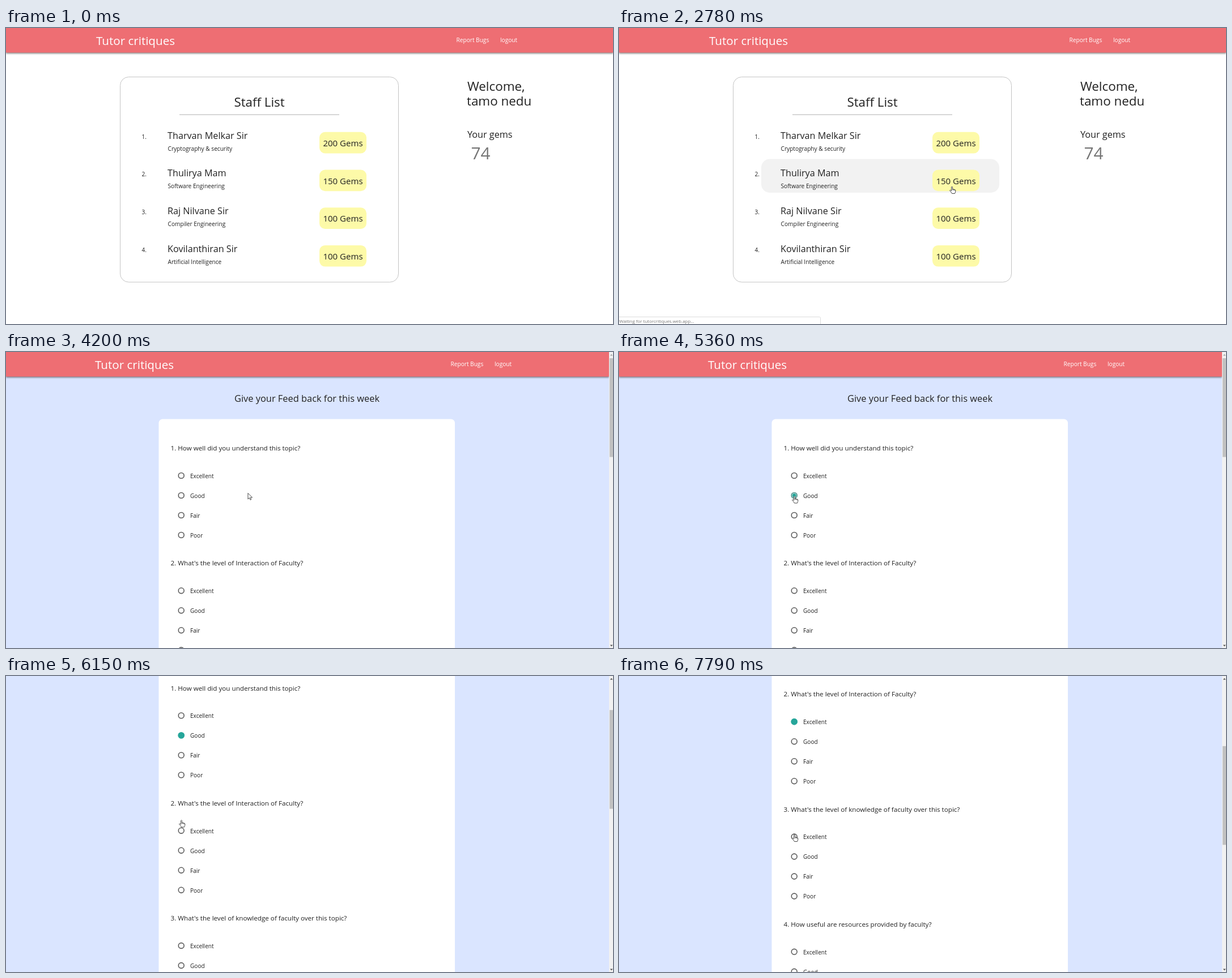
An HTML page with a canvas for the animation above (8 s loop, 1071 by 523 pixels).

```html
<!DOCTYPE html>
<html lang="en">
<head>
<meta charset="utf-8">
<title>Tutor critiques</title>
<style>
  html, body { margin: 0; width: 100%; height: 100%; overflow: hidden; background: #fff; }
  canvas { display: block; }
</style>
</head>
<body>
<canvas id="stage" width="1071" height="523"></canvas>
<script>
const W = 1071, H = 523, LOOP = 8000, STEP = 78;
const ctx = document.getElementById('stage').getContext('2d');
const INK = '#212121', TEAL = [38, 166, 154], GREY = [90, 90, 90];

const PAGE_SWITCH = 3020;
const ROW_TOP = 231.5, ROW_GAP = 66.7, ROW_HEIGHT = 59.5;
const QUESTION_GAP = 203.3, OPTION_GAP = 35;

const staff = [
  ['Tharvan Melkar Sir', 'Cryptography & security', 200],
  ['Thulirya Mam', 'Software Engineering', 150],
  ['Raj Nilvane Sir', 'Compiler Engineering', 100],
  ['Kovilanthiran Sir', 'Artificial Intelligence', 100]
];
const questions = [
  'How well did you understand this topic?',
  "What's the level of Interaction of Faculty?",
  "What's the level of knowledge of faculty over this topic?",
  'How useful are resources provided by faculty?'
];
const options = ['Excellent', 'Good', 'Fair', 'Poor'];

// Keys are [time, value, ...]
const pointerKeys = [
  [396, 957, 511], [624, 800, 420], [858, 660, 330], [1014, 605, 290],
  [1160, 581, 272.5], [1600, 581, 272.5], [1700, 587.5, 280],
  [3850, 587.5, 280], [4000, 540, 272], [4300, 380, 240], [4520, 288, 232.5],
  [4680, 301.5, 254], [4890, 309.5, 254.5],
  [6170, 309.5, 254.5], [6470, 309.5, 280]
];
const scrollKeys = [
  [5560, 0], [5700, 28], [5850, 86], [5928, 122], [6006, 136], [6084, 144],
  [6162, 148.5], [7440, 148.5], [7566, 200], [7644, 250], [7722, 303], [7800, 341]
];
const statusKeys = [[3180, 1], [3420, 0]];
const pickKeys = [
  { question: 0, option: 1, keys: [[5150, 0], [5240, 0.2], [5382, 0.6], [5540, 1]] },
  { question: 1, option: 0, keys: [[6840, 0], [7180, 1]] }
];

function track(keys, t) {
  if (t <= keys[0][0]) return keys[0].slice(1);
  for (let i = 1; i < keys.length; i++) {
    const a = keys[i - 1], b = keys[i];
    if (t < b[0]) {
      const p = (t - a[0]) / (b[0] - a[0]);
      return a.slice(1).map((v, j) => v + (b[j + 1] - v) * p);
    }
  }
  return keys[keys.length - 1].slice(1);
}

function text(str, x, y, size, color = INK, align = 'left') {
  ctx.font = `${size}px "Open Sans", "Noto Sans", sans-serif`;
  ctx.fillStyle = color;
  ctx.textAlign = align;
  ctx.fillText(str, x, y);
}

function rounded(x, y, w, h, r) {
  ctx.beginPath();
  ctx.roundRect(x, y, w, h, r);
}

function box(x, y, w, h, r, color) {
  rounded(x, y, w, h, r);
  ctx.fillStyle = color;
  ctx.fill();
}

function header(width, titleX, bugsX, logoutX) {
  ctx.save();
  ctx.shadowColor = 'rgba(0,0,0,.5)';
  ctx.shadowBlur = 3;
  ctx.shadowOffsetY = 1.2;
  ctx.fillStyle = '#ee6e73';
  ctx.fillRect(0, -10, width, 53.5);
  ctx.restore();
  text('Tutor critiques', titleX, 30, 20.6, '#fff');
  text('Report Bugs', bugsX, 25, 10.15, '#fff');
  text('logout', logoutX, 25, 10.15, '#fff');
}

function hoveredRow(x, y) {
  if (x < 251 || x > 671) return -1;
  return staff.findIndex((_, i) => {
    const top = ROW_TOP + (i - 1) * ROW_GAP;
    return y >= top && y <= top + ROW_HEIGHT;
  });
}

function listPage(hovered) {
  header(W, 159, 794.5, 872);
  rounded(201.5, 86.5, 491, 362.5, 15);
  ctx.strokeStyle = '#c4c4c4';
  ctx.lineWidth = 1;
  ctx.stroke();
  text('Staff List', 447, 139, 22.3, INK, 'center');
  ctx.fillStyle = '#bdbdbd';
  ctx.fillRect(306, 152.5, 282, 1.2);

  staff.forEach(([name, subject, gems], i) => {
    const dy = i * ROW_GAP;
    if (i === hovered) box(251, ROW_TOP + dy - ROW_GAP, 420, ROW_HEIGHT, 15, '#f2f2f2');
    text(`${i + 1}.`, 239.5, 195.7 + dy, 10.15);
    text(name, 285, 195.7 + dy, 16.2);
    text(subject, 285.5, 216.6 + dy, 10.15);
    box(553, 183.8 + dy, 83, 37.7, 10, '#fdfaa8');
    text(`${gems} Gems`, 594.5, 209 + dy, 15, INK, 'center');
  });

  text('Welcome,', 814, 111, 22.4);
  text('tamo nedu', 813, 137.3, 22.4);
  text('Your gems', 814, 193.7, 16.2);
  text('74', 820.5, 232, 29.8, '#757575');
}

function radio(x, y, fill) {
  const color = GREY.map((v, i) => Math.round(v + (TEAL[i] - v) * fill));
  ctx.beginPath();
  ctx.arc(x, y, 4.9, 0, Math.PI * 2);
  ctx.strokeStyle = `rgb(${color})`;
  ctx.lineWidth = 1.6;
  ctx.stroke();
  if (!fill) return;
  ctx.beginPath();
  ctx.arc(x, y, 5.7 * fill, 0, Math.PI * 2);
  ctx.fillStyle = `rgb(${TEAL})`;
  ctx.fill();
}

function triangle(y, tip, color) {
  ctx.beginPath();
  ctx.moveTo(1065.8, y);
  ctx.lineTo(1070.6, y);
  ctx.lineTo(1068.2, y + tip);
  ctx.fillStyle = color;
  ctx.fill();
}

function scrollbar(scroll) {
  ctx.fillStyle = '#f1f1f1';
  ctx.fillRect(1064, 0, 7, H);
  ctx.fillStyle = '#c1c1c1';
  ctx.fillRect(1065, 11 + scroll * 0.331, 6, 174.5);
  triangle(6.5, -2.8, scroll ? '#505050' : '#a3a3a3');
  triangle(517.5, 2.8, '#505050');
}

function formPage(t, scroll) {
  ctx.fillStyle = '#dae5ff';
  ctx.fillRect(0, 0, W, H);
  ctx.save();
  ctx.translate(0, -scroll);
  header(1064, 157, 784.5, 862);
  text('Give your Feed back for this week', 531, 88, 16.4, INK, 'center');
  box(269.5, 118.5, 522.5, 1100, 7, '#fff');
  questions.forEach((question, q) => {
    const dy = q * QUESTION_GAP;
    text(`${q + 1}. ${question}`, 290.5, 174 + dy, 11.65);
    options.forEach((option, o) => {
      const y = 218.4 + dy + o * OPTION_GAP;
      const pick = pickKeys.find(p => p.question === q && p.option === o);
      radio(309.2, y, pick ? track(pick.keys, t)[0] : 0);
      text(option, 325, y + 4.3, 10.05);
    });
  });
  ctx.restore();
  scrollbar(scroll);
}

function statusBar(alpha) {
  if (!alpha) return;
  ctx.save();
  ctx.globalAlpha = alpha;
  rounded(-1.5, 510.5, 357, 20, 2);
  ctx.fillStyle = '#fff';
  ctx.fill();
  ctx.strokeStyle = '#dcdcdc';
  ctx.lineWidth = 1;
  ctx.stroke();
  text('Waiting for tutorcritiques.web.app...', 0.5, 521, 7.9, '#777');
  ctx.restore();
}

const arrow = new Path2D('M0 0V10.6L2.5 8.3L4.1 12L5.8 11.2L4.2 7.7H7.6Z');
const hand = new Path2D('M-1 1Q0 -1 1 1V4.6L3 5L5 5.6Q6.5 6 6.4 7.8L6 10L5 12.5H0L-1.5 10L-4 7.2' +
  'Q-3.4 5.6 -2 6.8L-1 7.8ZM1 4.6V6.6M3 5V7M5 5.6V7.3');

function pointer(shape, x, y) {
  ctx.save();
  ctx.translate(x, y);
  ctx.fillStyle = '#fff';
  ctx.fill(shape);
  ctx.strokeStyle = '#2b2b2b';
  ctx.lineWidth = 0.85;
  ctx.lineJoin = 'round';
  ctx.stroke(shape);
  ctx.restore();
}

function draw(t) {
  // Motion advances in held steps, like a screen recording
  const s = Math.floor((t + 30) / STEP) * STEP;
  const [x, y] = track(pointerKeys, s);
  const visible = t >= 380;
  let shape = hand;

  ctx.fillStyle = '#fff';
  ctx.fillRect(0, 0, W, H);
  if (t < PAGE_SWITCH) {
    const row = visible ? hoveredRow(x, y) : -1;
    if (row < 0) shape = arrow;
    listPage(row);
  } else {
    if (t >= 3890 && t < 4660) shape = arrow;
    formPage(s, track(scrollKeys, s)[0]);
  }
  if (t >= 2780) statusBar(track(statusKeys, s)[0]);
  if (visible) pointer(shape, x, y);
}

const start = performance.now();
function frame() {
  draw((performance.now() - start) % LOOP);
  requestAnimationFrame(frame);
}
frame();
</script>
</body>
</html>
```
